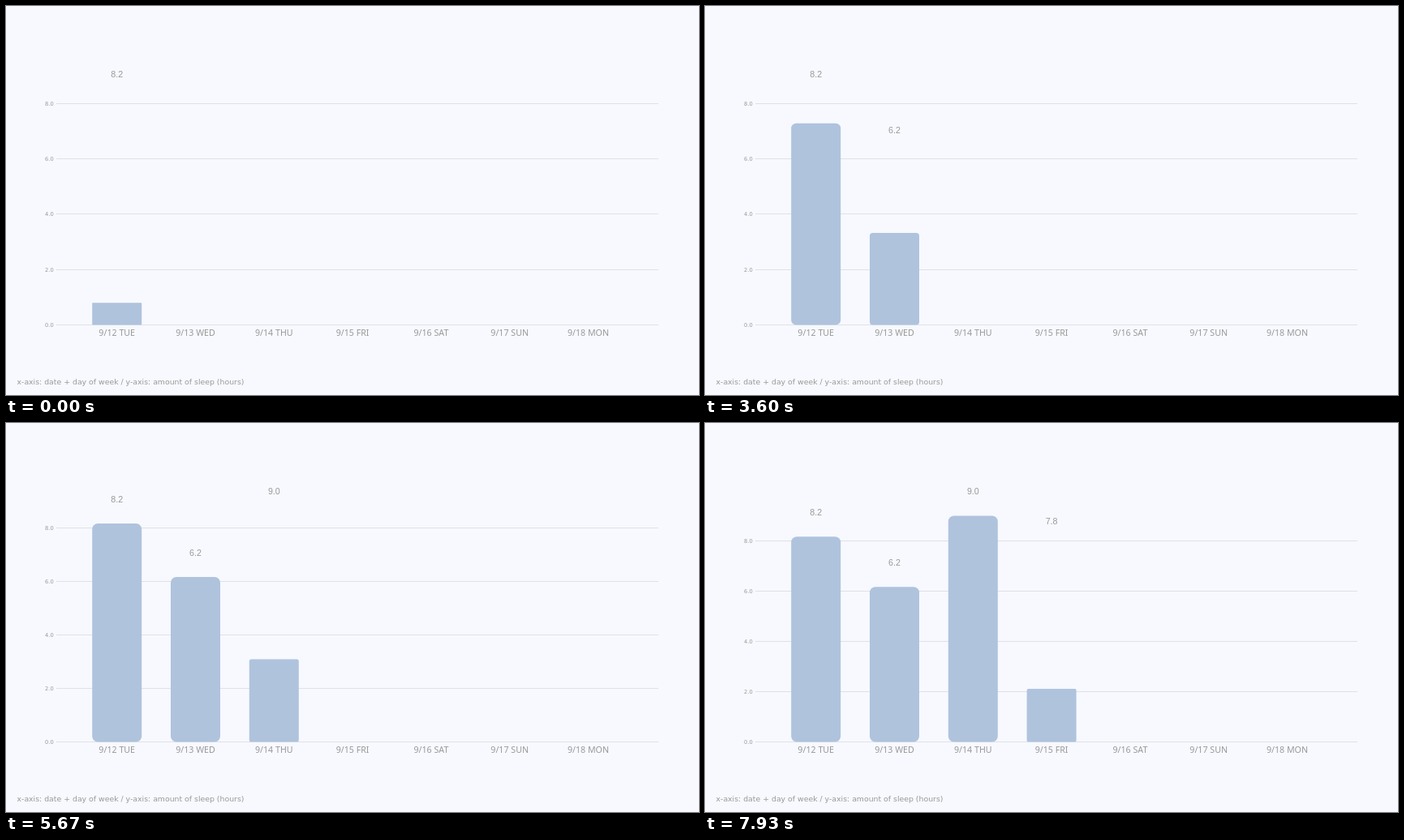
An HTML page for the animation above (8 s loop, 854 px wide and 480 px high).

```html
<!DOCTYPE html>
<html lang="en">
<head>
<meta charset="utf-8">
<style>
  html, body { margin: 0; width: 100%; height: 100%; overflow: hidden; background: #f7f9fe; }
  svg { display: block; width: 854px; height: 480px; }
  text { fill: #999; }
  .tick { font: 6.67px "DejaVu Sans", sans-serif; text-anchor: end; }
  .day { font: 10.67px "Noto Sans", sans-serif; text-anchor: middle; }
  .value { font: 10.67px "Liberation Sans", sans-serif; text-anchor: middle; }
  .note { font: 9.33px "DejaVu Sans", sans-serif; }
  .grid { fill: #dfe1e6; }
  .bar { fill: #afc3dd; }
</style>
</head>
<body>
<svg viewBox="0 0 854 480"></svg>
<script>
const LOOP = 8000, STEP = 1000 / 15;
const BASE = 393.5, FULL = 279, BAR_WIDTH = 61;
const days = ['9/12 TUE', '9/13 WED', '9/14 THU', '9/15 FRI', '9/16 SAT', '9/17 SUN', '9/18 MON'];

// keys: [time in ms, share of the final height]
const sleep = [
  { hours: 8.17, keys: [[0, .098], [1000, .518], [2260, .765], [4745, 1]] },
  { hours: 6.17, keys: [[2265, 0], [4745, 1]] },
  { hours: 9, keys: [[4720, 0], [5667, .366], [7245, 1]] },
  { hours: 7.83, keys: [[7260, 0], [9760, 1]] }
];
const unitBefore = FULL / 8.17, unitAfter = FULL / 9;

const svg = document.querySelector('svg');
function add(tag, className, attributes = {}, content = '') {
  const node = document.createElementNS('http://www.w3.org/2000/svg', tag);
  node.setAttribute('class', className);
  set(node, attributes);
  node.textContent = content;
  return svg.appendChild(node);
}
function set(node, attributes) {
  for (const name in attributes) node.setAttribute(name, attributes[name]);
}
const columnCenter = i => 136.7 + 96.8 * i;

const ticks = [0, 2, 4, 6, 8].map(hours => ({
  hours,
  line: add('rect', 'grid', { x: 62, width: 742, height: 1 }),
  label: add('text', 'tick', { x: 58.7 }, hours.toFixed(1))
}));
sleep.forEach((item, i) => {
  const x = columnCenter(i);
  item.bar = add('rect', 'bar', { x: x - BAR_WIDTH / 2, width: BAR_WIDTH });
  item.label = add('text', 'value', { x }, item.hours.toFixed(1));
});
days.forEach((day, i) => add('text', 'day', { x: columnCenter(i), y: 406.8 }, day));
add('text', 'note', { x: 13.5, y: 466.8 }, 'x-axis: date + day of week / y-axis: amount of sleep (hours)');

function progress(keys, time) {
  if (time <= keys[0][0]) return keys[0][1];
  for (let i = 1; i < keys.length; i++) {
    const [t0, p0] = keys[i - 1], [t1, p1] = keys[i];
    if (time < t1) return p0 + (p1 - p0) * (time - t0) / (t1 - t0);
  }
  return 1;
}

function draw(time) {
  const rescale = progress(sleep[2].keys, time);
  const unit = unitBefore + (unitAfter - unitBefore) * rescale;

  for (const { hours, line, label } of ticks) {
    const y = Math.floor(BASE - hours * unit);
    set(line, { y });
    set(label, { y: y + 2.9 });
  }
  sleep.forEach(({ hours, keys, bar, label }, i) => {
    const share = progress(keys, time);
    const target = hours * (i < 2 ? unit : unitAfter);
    const height = target * share;
    set(bar, { y: BASE - height, height, rx: 7 * share });
    set(label, {
      y: BASE - target - 26.2,
      visibility: time >= keys[0][0] ? 'visible' : 'hidden'
    });
  });
}

function frame() {
  const time = performance.now() % LOOP;
  draw(Math.floor((time + 5) / STEP) % 120 * STEP);
  requestAnimationFrame(frame);
}
frame();
</script>
</body>
</html>
```
